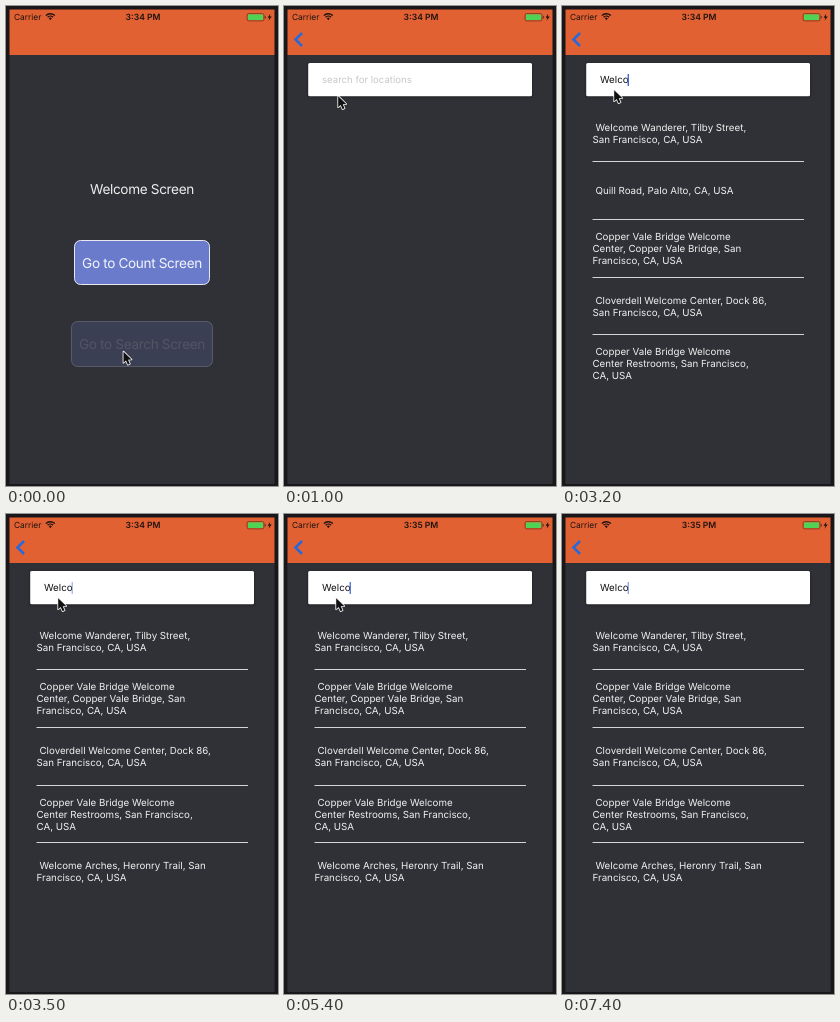
Animation of 272 by 480 pixels, one loop 7.5 s. Source, as an HTML page with a canvas:

```html
<!DOCTYPE html>
<html lang="en">
<head>
<meta charset="utf-8">
<title>Location search</title>
<style>
  html, body { margin: 0; width: 100%; height: 100%; overflow: hidden; background: #19171a; }
  canvas { display: block; width: 272px; height: 480px; }
</style>
</head>
<body>
<canvas id="stage"></canvas>
<script>
const LOOP = 7500;
const SCREEN = { x: 3.5, y: 3.5, w: 265, h: 474.5 };
const HEADER_BOTTOM = 49;
const BACKGROUND = '#303136';
const QUERY = 'Welco';
const KEY_TIMES = [1650, 1950, 2250, 2550, 2950];
const FOCUS_TIME = 1250, LIST_TIME = 2150, REFINE_TIME = 3500, CLOCK_TIME = 4050;
const POINTER_HIDE_TIME = 6500;

const lantern = ['Welcome Wanderer, Tilby Street,', 'San Francisco, CA, USA'];
const road = ['Quill Road, Palo Alto, CA, USA'];
const bridge = ['Copper Vale Bridge Welcome', 'Center, Copper Vale Bridge, San', 'Francisco, CA, USA'];
const dock = ['Cloverdell Welcome Center, Dock 86,', 'San Francisco, CA, USA'];
const restrooms = ['Copper Vale Bridge Welcome', 'Center Restrooms, San Francisco,', 'CA, USA'];
const arches = ['Welcome Arches, Heronry Trail, San', 'Francisco, CA, USA'];
const firstResults = [lantern, road, bridge, dock, restrooms];
const refinedResults = [lantern, bridge, dock, restrooms, arches];

const canvas = document.getElementById('stage');
const ctx = canvas.getContext('2d');
const ratio = window.devicePixelRatio || 1;
canvas.width = 272 * ratio;
canvas.height = 480 * ratio;

const clamp = v => Math.max(0, Math.min(1, v));
const smooth = v => { v = clamp(v); return v * v * (3 - 2 * v); };
const ramp = (t, from, to) => clamp((t - from) / (to - from));
const mix = (a, b, v) => a + (b - a) * v;

function rect(x, y, w, h, color) {
  ctx.fillStyle = color;
  ctx.fillRect(x, y, w, h);
}

function text(str, x, y, size, color, { align = 'left', weight = 400, spacing = 0 } = {}) {
  ctx.font = `${weight} ${size}px Inter, Roboto, sans-serif`;
  ctx.letterSpacing = spacing + 'px';
  ctx.textAlign = align;
  ctx.textBaseline = 'alphabetic';
  ctx.textRendering = 'geometricPrecision';
  ctx.fillStyle = color;
  ctx.fillText(str, x, y);
  return ctx.measureText(str).width;
}

function polygon(points, fill, stroke, width = 1) {
  ctx.beginPath();
  points.forEach(([x, y]) => ctx.lineTo(x, y));
  ctx.closePath();
  if (stroke) {
    ctx.strokeStyle = stroke;
    ctx.lineWidth = width;
    ctx.stroke();
  }
  ctx.fillStyle = fill;
  ctx.fill();
}

function button(label, x, y, w, h, opacity) {
  ctx.save();
  ctx.globalAlpha *= opacity;
  ctx.beginPath();
  ctx.roundRect(x + .5, y + .5, w - 1, h - 1, 6);
  ctx.fillStyle = '#6b7bcc';
  ctx.fill();
  ctx.strokeStyle = '#e6e8f2';
  ctx.lineWidth = 1;
  ctx.stroke();
  text(label, x + w / 2, y + 27.5, 13.6, opacity < .5 ? '#b4aea8' : '#f4f5fa', { align: 'center', spacing: -.35 });
  ctx.restore();
}

function welcomeScreen(t) {
  text('Welcome Screen', 136, 188, 13.6, '#eeeeef', { align: 'center', spacing: -.35 });
  button('Go to Count Screen', 68, 234, 136, 45, 1);
  button('Go to Search Screen', 65, 315, 142, 46, mix(.2, 1, ramp(t, 20, 170)));
}

function caretOpacity(t) {
  if (t < FOCUS_TIME) return 0;
  if (t < 3450) return 1;
  const phase = ((t - 5390) % 980 + 980) % 980;
  return phase < 490 ? Math.pow(1 - clamp(phase / 300), 3) : smooth((phase - 490) / 310);
}

function searchScreen(t) {
  rect(SCREEN.x, HEADER_BOTTOM, SCREEN.w, 430, BACKGROUND);
  ctx.save();
  ctx.shadowColor = 'rgba(0,0,0,.45)';
  ctx.shadowBlur = 3 * ratio;
  ctx.shadowOffsetY = .7 * ratio;
  ctx.beginPath();
  ctx.roundRect(24.2, 57, 223.8, 33.3, 1.5);
  ctx.fillStyle = '#fff';
  ctx.fill();
  ctx.restore();

  const typed = QUERY.slice(0, KEY_TIMES.filter(k => t >= k).length);
  if (!typed) text('search for locations', 38, 77.2, 9.6, '#c8c8cc');
  const width = typed ? text(typed, 38, 77.2, 9.75, '#111') : 0;
  ctx.globalAlpha = caretOpacity(t);
  rect(38 + Math.max(width - 1, 0), 68, 1.4, 12, '#4468d8');
  ctx.globalAlpha = 1;

  if (t >= LIST_TIME) results(t < REFINE_TIME ? firstResults : refinedResults);
}

function results(items) {
  items.forEach((lines, row) => {
    const middle = 127.1 + row * 57.65;
    lines.forEach((line, i) => {
      const y = middle + (i - (lines.length - 1) / 2) * 12 + 3.7;
      text(line, i ? 30.5 : 33.5, y, 9.75, '#f0f0f1');
    });
    if (row < items.length - 1) rect(30.5, Math.round(155.3 + row * 57.7), 211.5, 1, '#d4d4d6');
  });
}

function statusBar(t) {
  const ink = '#20130f';
  text('Carrier', 8, 14, 8.4, ink);
  text(t < CLOCK_TIME ? '3:34 PM' : '3:35 PM', 137, 14, 8.6, ink, { align: 'center', weight: 600 });

  ctx.strokeStyle = ink;
  ctx.lineWidth = 1.4;
  for (const r of [3.7, 6.1]) {
    ctx.beginPath();
    ctx.arc(44.3, 13.8, r, -Math.PI * .76, -Math.PI * .24);
    ctx.stroke();
  }
  polygon([[44.3, 14.2], [42.8, 12.3], [44.3, 11.6], [45.8, 12.3]], ink);

  ctx.beginPath();
  ctx.roundRect(241, 7.5, 17, 7.4, 1.8);
  ctx.strokeStyle = 'rgba(32,19,15,.6)';
  ctx.lineWidth = .7;
  ctx.stroke();
  rect(242, 8.4, 15, 5.6, '#50d355');
  rect(258.8, 10, 1, 2.4, 'rgba(32,19,15,.6)');
  polygon([[264.3, 7.8], [261.6, 11.8], [263.4, 11.8], [262.5, 14.8], [265.8, 10.6], [263.9, 10.6]], ink);
}

function backArrow(opacity) {
  ctx.save();
  ctx.globalAlpha = opacity;
  ctx.strokeStyle = '#2569dc';
  ctx.lineWidth = 2.5;
  ctx.beginPath();
  ctx.moveTo(18, 27);
  ctx.lineTo(11.5, 33.5);
  ctx.lineTo(18, 40);
  ctx.stroke();
  ctx.restore();
}

function pointer(t) {
  if (t >= POINTER_HIDE_TIME) return;
  const travel = smooth(ramp(t, 450, 960));
  const settle = smooth(ramp(t, 1020, 1300));
  const x = mix(117.5, 54.2, travel) - 2 * settle;
  const y = mix(345.7, 90.2, travel) - 6 * settle;
  const arrow = [[0, 0], [0, 11], [2.5, 8.8], [4.4, 13], [6.3, 12.1], [4.5, 8], [8, 7.8]];
  ctx.lineJoin = 'round';
  polygon(arrow.map(([dx, dy]) => [x + dx, y + dy]), '#111', '#f4f4f4', 1.7);
  ctx.lineJoin = 'miter';
}

// Critically damped slide from the first screen to the second.
function pushProgress(t) {
  const s = Math.max(0, t - 30) * .0191;
  return t > 700 ? 1 : 1 - (1 + s) * Math.exp(-s);
}

function draw(t) {
  const push = pushProgress(t);
  ctx.setTransform(ratio, 0, 0, ratio, 0, 0);
  rect(0, 0, 272, 480, '#19171a');
  ctx.save();
  ctx.beginPath();
  ctx.rect(SCREEN.x, SCREEN.y, SCREEN.w, SCREEN.h);
  ctx.clip();
  rect(0, HEADER_BOTTOM, 272, 431, BACKGROUND);

  if (push < 1) {
    ctx.save();
    ctx.translate(-SCREEN.w * .3 * push, 0);
    welcomeScreen(t);
    ctx.restore();
    rect(SCREEN.x, HEADER_BOTTOM, SCREEN.w, 430, `rgba(0,0,0,${.12 * push})`);
  }
  if (push > 0) {
    ctx.save();
    ctx.translate(SCREEN.w * (1 - push), 0);
    searchScreen(t);
    ctx.restore();
  }

  rect(0, 0, 272, HEADER_BOTTOM, '#e16133');
  statusBar(t);
  backArrow(ramp(t, 80, 330));
  ctx.restore();
  pointer(t);
}

const start = performance.now();
function tick() {
  draw((performance.now() - start) % LOOP);
  requestAnimationFrame(tick);
}
tick();
</script>
</body>
</html>
```
